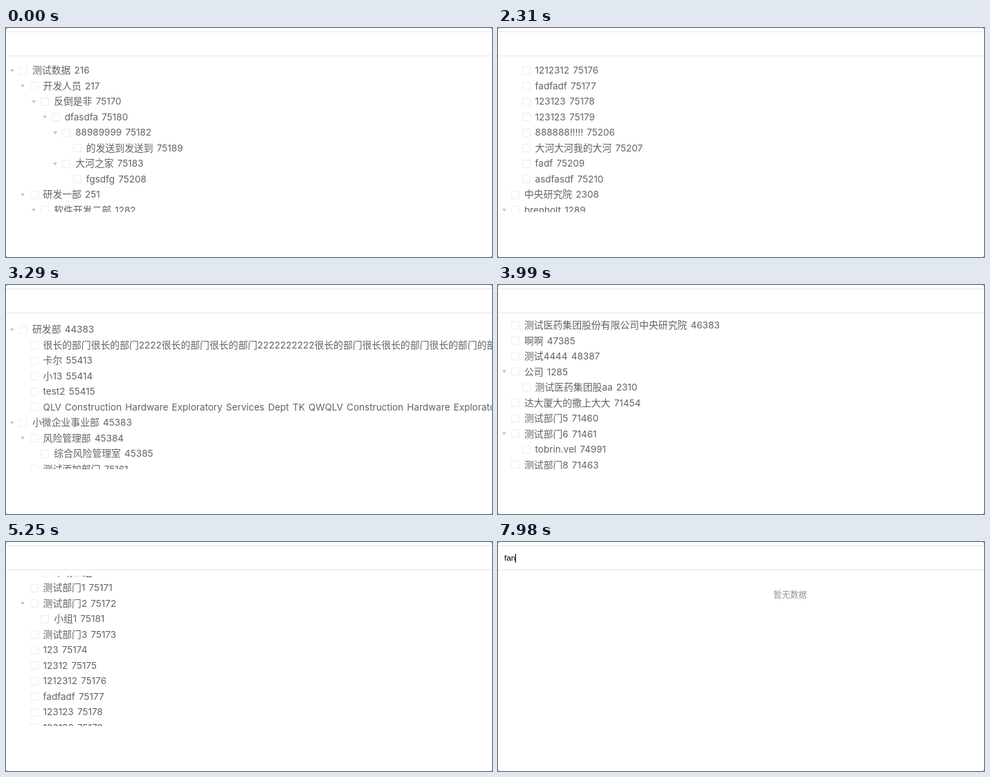
An HTML page for the animation above (8 s loop, 702 px wide and 332 px high).

```html
<!DOCTYPE html>
<html lang="zh-CN">
<head>
<meta charset="utf-8">
<title>Tree</title>
<style>
  html, body { margin: 0; width: 100%; height: 100%; overflow: hidden; background: #666; }
  #stage { position: relative; width: 702px; height: 332px; overflow: hidden; background: #fff; border-radius: 2.5px; }
  .line { position: absolute; left: 0; width: 100%; height: 1px; background: #e6e6e6; }
  #input { position: absolute; left: 9px; top: 16px; height: 15px; display: flex; align-items: center;
    font: 11.8px/15px "Liberation Sans", Arial, sans-serif; color: #000; }
  #caret { width: 1px; height: 13px; background: #000; }
  #view { position: absolute; left: 0; top: 49px; width: 702px; height: 217.5px; overflow: hidden; }
  .tree { position: absolute; left: 0; top: 1.25px; width: 100%; }
  .row { position: absolute; height: 22.5px; white-space: nowrap; color: #606266;
    font: 13.84px/22.5px Inter, "Noto Sans CJK SC", "Noto Sans CJK", sans-serif; }
  .row span { font-size: 13.5px; word-spacing: 1.4px; }
  .row p { position: absolute; left: 38px; top: 0; margin: 0; }
  .row i { position: absolute; left: 19px; top: 5.25px; width: 12px; height: 12px; box-sizing: border-box;
    border: 1px solid #ebedf0; border-radius: 2px; background: #fff; }
  .open::before { content: ""; position: absolute; left: 5.8px; top: 9.6px;
    border: 3.3px solid transparent; border-top: 4px solid #c0c4cc; border-bottom: 0; }
  #empty { position: absolute; left: 322px; top: 65px; width: 200px; text-align: center; color: #909399;
    font: 12.1px/21px "Noto Sans CJK SC", "Noto Sans CJK", sans-serif; }
</style>
</head>
<body>
<div id="stage">
  <div class="line" style="top:5px"></div>
  <div class="line" style="top:40px"></div>
  <div id="input"><span id="typed"></span><div id="caret"></div></div>
  <div id="view"></div>
  <div id="empty">暂无数据</div>
</div>
<script>
const LOOP = 8000, TICK = 70, PITCH = 22.5, INDENT = 15.57;

// The leading digit is the depth in the tree.
const rows = `0测试数据 216
1开发人员 217
2反倒是非 75170
3dfasdfa 75180
488989999 75182
5的发送到发送到 75189
4大河之家 75183
5fgsdfg 75208
1研发一部 251
2软件开发二部 1282
3平台一组 1290
3平台二组 1291
2测试小组 1283
1研发二部 252
2前端组 1284
2后端组 1286
1综合部门 253
2很长的部门很长的部门很长的部门很长的部门很长的部门很长的部门很长的部门很长的部门很长的部门 1287
2运维组 1288
1市场部 254
2市场一组 1292
2市场二组 1293
1测试部门1 75171
1测试部门2 75172
2小组1 75181
1测试部门3 75173
1123 75174
112312 75175
11212312 75176
1fadfadf 75177
1123123 75178
1123123 75179
1888888!!!!! 75206
1大河大河我的大河 75207
1fadf 75209
1asdfasdf 75210
0中央研究院 2308
0brenholt 1289
1测试一组 2311
1测试二组 2312
0人力资源部 41380
1招聘组 41381
1培训组 41382
0财务部 43380
1财务管理综合办公室 43381
1会计组 43382
0行政部 43385
0采购部 43390
0研发部 44383
1很长的部门很长的部门2222很长的部门很长的部门2222222222很长的部门很长很长的部门很长的部门的部门很长的部门 55412
1卡尔 55413
1小13 55414
1test2 55415
1QLV Construction Hardware Exploratory Services Dept TK QWQLV Construction Hardware Exploratory Services 55416
0小微企业事业部 45383
1风险管理部 45384
2综合风险管理室 45385
1测试添加部门 75161
1测试添加部门2 75162
1测试添加部门3 75163
2小组2 75164
1信贷管理部 75165
1客户服务部 75166
1业务部 75167
0测试医药集团股份有限公司中央研究院 46383
0啊啊 47385
0测试4444 48387
0公司 1285
1测试医药集团股aa 2310
0达大厦大的撒上大大 71454
0测试部门5 71460
0测试部门6 71461
1tobrin.vel 74991
0测试部门8 71463
0测试部门25 71480
0测试部门26 71481
0测试部门27 71482
0测试部门28 71483
0测试部门29 71484
0测试部门30 71485
0测试部门31 71486
0测试部门32 71487`.split("\n");

// Time in ms and scroll offset in px.
const scroll = [
  [1400, 0], [1540, 30], [1820, 330], [2100, 555], [2310, 630], [2800, 725], [3010, 800],
  [3080, 875], [3290, 1077], [3500, 1230], [3710, 1345], [3990, 1443.5], [4200, 1535],
  [4480, 1600], [4620, 1600], [4690, 1592], [4830, 1553.5], [4970, 1360], [5180, 720],
  [5320, 260], [5460, 0]
];

const $ = id => document.getElementById(id);
const show = (el, on) => el.style.display = on ? "" : "none";

function buildTree(list) {
  const tree = document.createElement("div");
  tree.className = "tree";
  list.forEach((line, i) => {
    const depth = +line[0], next = list[i + 1];
    const row = document.createElement("div");
    row.className = next && +next[0] > depth ? "row open" : "row";
    row.style.left = depth * INDENT + "px";
    row.style.top = i * PITCH + "px";
    row.innerHTML = "<i></i><p>" + line.slice(1).replace(/[ -~]+/g, "<span>$&</span>") + "</p>";
    tree.append(row);
  });
  $("view").append(tree);
  return tree;
}

function offsetAt(t) {
  const k = scroll.findIndex(p => p[0] > t);
  if (k < 1) return 0;
  const [t0, y0] = scroll[k - 1], [t1, y1] = scroll[k];
  return y0 + (y1 - y0) * (t - t0) / (t1 - t0);
}

const full = buildTree(rows);
const found = buildTree(rows.filter((line, i) => i < 8 || line.includes("fa")));

function draw(time) {
  const t = Math.floor(time / TICK) * TICK;
  full.style.transform = `translateY(${-offsetAt(t)}px)`;
  show(full, t < 7770);
  show(found, t >= 7770 && t < 7980);
  show($("empty"), t >= 7980);
  $("typed").textContent = "fan".slice(0, t < 7770 ? 0 : t < 7840 ? 1 : t < 7980 ? 2 : 3);
  show($("caret"), t >= 6300 && t < 6790 || t >= 7350);
}

const start = performance.now();
function loop() {
  draw((performance.now() - start) % LOOP);
  requestAnimationFrame(loop);
}
loop();
</script>
</body>
</html>
```
